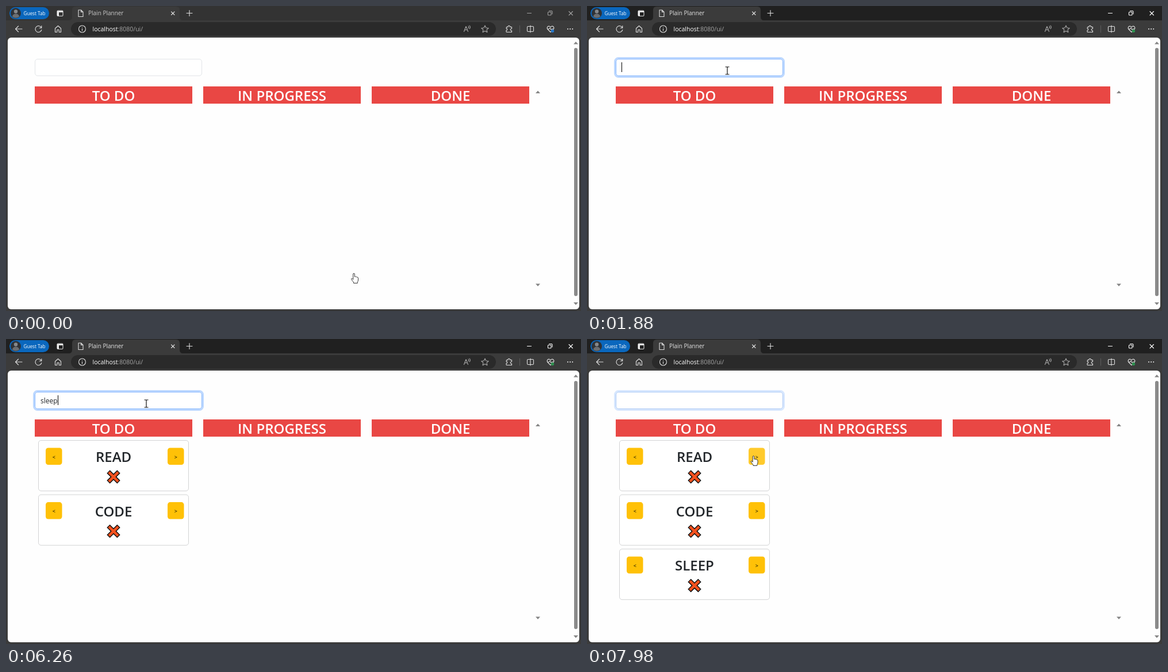
An HTML page that plays this animation: 1000x531 px, repeating every 8000 ms.

```html
<!DOCTYPE html>
<html lang="en">
<head>
<meta charset="utf-8">
<title>Plain Planner</title>
<style>
html, body { margin: 0; width: 100%; height: 100%; overflow: hidden; background: #3b3b3b; }
svg { display: block; width: 100%; height: 100%; font-family: "Open Sans", "Noto Sans", sans-serif; }
.line { fill: none; stroke: #dedede; stroke-width: 1.1; stroke-linecap: round; stroke-linejoin: round; }
.big { font-size: 24px; font-weight: 600; text-anchor: middle; }
.sign { font-size: 9px; text-anchor: middle; }
</style>
</head>
<body>
<svg viewBox="0 0 1000 531">
  <rect width="1000" height="531" fill="#3b3b3b"/>
  <rect id="bar" width="1000" height="25"/>

  <!-- title bar -->
  <rect x="6" y="2" width="69" height="21" rx="10.5" fill="#0a67bd"/>
  <circle cx="17" cy="12.5" r="9" fill="#2f3236"/>
  <circle cx="17" cy="9.5" r="3.2" fill="#85888c"/>
  <path d="M11 18.5a6 5 0 0 1 12 0a9 9 0 0 1-12 0z" fill="#6b6e72"/>
  <text x="30.5" y="16" font-size="8.2" fill="#fff">Guest Tab</text>
  <rect class="line" x="89" y="8" width="10" height="9.5" rx="1.5"/>
  <path d="M89 8.5h10v2.5h-7v6h-3z" fill="#eee"/>
  <path d="M109 25q6 0 6-6V7q0-6 6-6h175q6 0 6 6v12q0 6 6 6z" fill="#3b3b3b"/>
  <path class="line" d="M126 7h4.5l3.5 3.5V18.5h-8zM130.500 7v3.500h3.500"/>
  <text id="tab" x="143" y="16" font-size="10" fill="#e4e4e4">Plain Planner</text>
  <path class="line" d="M287.500 10l5.500 5.500m0-5.500l-5.500 5.500M314 12.500h10m-5-5v10"/>
  <g id="controls" class="line">
    <path d="M906.500 12.500h7M979 9.500l6.500 6.500m0-6.500l-6.500 6.500"/>
    <rect x="942.500" y="10.500" width="5.500" height="5.500" rx="1"/>
    <path d="M944.500 8.500h4q1.500 0 1.500 1.500v4"/>
  </g>

  <!-- toolbar -->
  <rect x="113" y="28" width="739" height="24" rx="12" fill="#2a2a2a"/>
  <g class="line">
    <path d="M28 40H16.500m5-5l-5 5l5 5"/>
    <path d="M61.500 38a5.500 5.500 0 1 0 .3 3.500M61.800 34.500v3.700h-3.700"/>
    <path d="M85.500 39l5-4.500l5 4.500v6.500h-3.300v-4h-3.400v4h-3.300z"/>
    <circle cx="132.500" cy="40" r="6"/>
    <path d="M132.500 39.500v3.500m0-6v.2"/>
    <g stroke="#a8a8a8">
      <path d="M796.500 44.500l3.500-9l3.500 9m-5.800-3h4.600M804 35q1.500 1.800 0 3.600M806 34q2.600 2.800 0 5.600"/>
      <path d="M833 34l1.900 4l4.300.5l-3.200 2.900l.9 4.300l-3.900-2.200l-3.900 2.200l.9-4.300l-3.200-2.900l4.300-.5z"/>
    </g>
    <path d="M870.500 36.500h2.500a1.800 1.800 0 1 1 3.500 0h3v3a1.800 1.800 0 1 0 0 3.500v2.500h-8.500q-1 0-1-1v-2a1.700 1.700 0 1 0 0-3.400z"/>
    <path d="M893.500 34v12" stroke="#5b5b5b"/>
    <rect x="906.500" y="35.500" width="11" height="9" rx="1.500"/>
    <path d="M912 34v12"/>
    <path d="M947 45.500l-5-5q-1.800-2.300 0-4.500q2.500-2 5 .8q2.500-2.800 5-.8q1.800 2.200 0 4.500zM941.500 40h3l1.500-2l2 3.500l1.300-1.500h3"/>
  </g>
  <circle id="pulse" cx="950.500" cy="43.500" r="2.700"/>
  <path d="M977 40h.1m4 0h.1m4 0h.1" stroke="#eee" stroke-width="1.900" stroke-linecap="round"/>
  <text x="150.500" y="44" font-size="10.500" fill="#a5a5a5"><tspan fill="#fff">localhost</tspan>:8080/ui/</text>

  <!-- page -->
  <rect x="3" y="55" width="994" height="473" rx="6" fill="#fefefe"/>
  <rect x="988" y="73" width="6" height="432" rx="3" fill="#8a8a8a"/>
  <path d="M987 66.500l4-4.500l4 4.500zM987 516l4 4.500l4-4.500zM921 152l4-4.500l4 4.500zM921 483.500l4 4.500l4-4.500z" fill="#858585"/>
  <rect id="ring" x="48.500" y="90.500" width="294" height="33" rx="6.500" fill="none" stroke="#0d6efd" stroke-opacity=".27" stroke-width="3"/>
  <rect id="field" x="50.500" y="92.500" width="290" height="29" rx="4.500" fill="#fff"/>
  <text id="typed" x="60" y="112" font-size="12" fill="#212529"></text>
  <path id="caret" d="M0 98v17" stroke="#000"/>
  <g id="board"></g>

  <!-- pointers, each with its hot spot at 0,0 -->
  <path id="arrow" d="M0 0v13l3-2.800l2 4.500l2.200-1l-2-4.300h4.100z" fill="#fff" stroke="#222" stroke-width=".9"/>
  <path id="beam" d="M-3.500-6.500h2.500q1 0 1 1v11q0 1-1 1h-2.500M3.500-6.500h-2.500q-1 0-1 1m0 11q0 1 1 1h2.500" fill="none" stroke="#111" stroke-width="1.200"/>
  <path id="hand" d="M-1.300 1q0-1.500 1.300-1.500t1.300 1.500v4.300q1.200-1 2.200.3q1.200-.7 2 .5q2-.3 2 1.700v3.200q0 2-1.200 3.500v2h-6.800v-1.600q-2.300-2.400-4-5.400q.3-1.800 1.700-.8l1.500 1.500z" fill="#fff" stroke="#222" stroke-width=".9" stroke-linejoin="round"/>
</svg>
<script>
const $ = id => document.getElementById(id);
const clamp = v => Math.min(1, Math.max(0, v));
// Fraction done of a move shown in n equal steps; the first shows at start.
const steps = (t, start, end, n) =>
  t < start ? 0 : clamp((Math.floor((t - start) / (end - start) * (n - 1) + 1e-6) + 1) / n);
const mix = (a, b, p) => a.map((v, i) => v + (b[i] - v) * p);
const rgb = c => `rgb(${c.map(Math.round)})`;

const LOOP = 8000;
const words = [
  { text: "read", keys: [2530, 2652, 2775, 2897], enter: 3020 },
  { text: "code", keys: [3730, 3900, 4070, 4270], enter: 4470 },
  { text: "sleep", keys: [4880, 5350, 5650, 6160, 6260], enter: 6430 }
];
const caretOff = [[0, 1760], [2290, 2530], [3430, 3730], [6970, 7500], [7950, LOOP]];

const button = (x, sign) =>
  `<rect x="${x}" y="189.500" width="28.500" height="29.500" rx="4.500" fill="#ffc107"/>
   <text class="sign" x="${x + 14.250}" y="208.500">${sign}</text>`;
const cross = "M178 231l18 18m0-18l-18 18";
const card = (word, i) =>
  `<g id="card${i}" transform="translate(0 ${i * 94.6})">
    <rect x="56.500" y="176.500" width="261" height="88" rx="4.500" fill="#fff" stroke="#d2d3d4"/>
    ${button(69, "&lt;")}${button(281, "&gt;")}
    <text class="big" x="187" y="214" fill="#212529">${word.text.toUpperCase()}</text>
    <path d="${cross}" stroke="#111" stroke-width="7.600"/>
    <path d="${cross}" stroke="#f4511e" stroke-width="4.600" stroke-dasharray="22.800 40" stroke-dashoffset="-1.300"/>
  </g>`;
$("board").innerHTML = ["TO DO", "IN PROGRESS", "DONE"].map((name, i) =>
  `<rect x="${50 + i * 293}" y="140" width="274" height="30" fill="#e94744"/>
   <text class="big" x="${187 + i * 293}" y="165" fill="#fff">${name}</text>`).join("") +
  words.map(card).join("");
const next = $("card0").querySelectorAll("rect")[2];

function pointer(t) {
  if (t < 880) return ["hand", [605, 466]];
  if (t < 1470) {
    const p = steps(t, 1080, 1200, 5);
    return ["arrow", mix([605, 466], [252, 143], 1 - (1 - p) ** 2)];
  }
  if (t < 7370) {
    const spot = mix([250, 136], [244, 112.5], steps(t, 1470, 1590, 5) * 1.25 - .25);
    return [spot[1] < 123 ? "beam" : "arrow", spot];
  }
  const p = steps(t, 7370, 7980, 19);
  const spot = mix([244, 112.5], [289.5, 204], 1 - (1 - p) ** 2);
  return [spot[1] < 123 ? "beam" : spot[1] < 190 ? "arrow" : "hand", spot];
}

function draw(t) {
  const active = t >= 880;
  $("bar").setAttribute("fill", active ? "#202020" : "#333");
  $("tab").setAttribute("opacity", active ? 1 : .85);
  $("controls").setAttribute("stroke-opacity", 1);
  $("controls").style.stroke = active ? "#fff" : "#a0a0a0";
  $("pulse").setAttribute("fill", t < 1760 ? "#2878c8" : "#2f9150");

  const focus = steps(t, 1760, 1880, 5) - steps(t, 7950, 8070, 5);
  $("ring").setAttribute("opacity", focus);
  $("field").setAttribute("stroke", rgb(mix([226, 229, 232], [134, 183, 254], focus)));

  let text = "";
  words.forEach((w, i) => {
    if (t < w.enter) text += w.text.slice(0, w.keys.filter(k => t >= k).length);
    $("card" + i).setAttribute("visibility", t >= w.enter ? "visible" : "hidden");
  });
  $("typed").textContent = text;
  const end = text ? $("typed").getComputedTextLength() : 0;
  $("caret").setAttribute("transform", `translate(${Math.round(60 + end) + .5} 0)`);
  const off = caretOff.some(([a, b]) => t >= a && t < b);
  $("caret").setAttribute("visibility", off ? "hidden" : "visible");

  const [shape, [x, y]] = pointer(t);
  for (const id of ["arrow", "beam", "hand"])
    $(id).setAttribute("visibility", id === shape ? "visible" : "hidden");
  $(shape).setAttribute("transform", `translate(${x} ${y})`);
  const hover = t < 7370 ? 0 : steps(t, 7740, 7880, 5);
  next.setAttribute("fill", rgb(mix([255, 193, 7], [255, 202, 44], hover)));
}

const start = performance.now();
function tick() {
  draw((performance.now() - start) % LOOP);
  requestAnimationFrame(tick);
}
tick();
</script>
</body>
</html>
```
